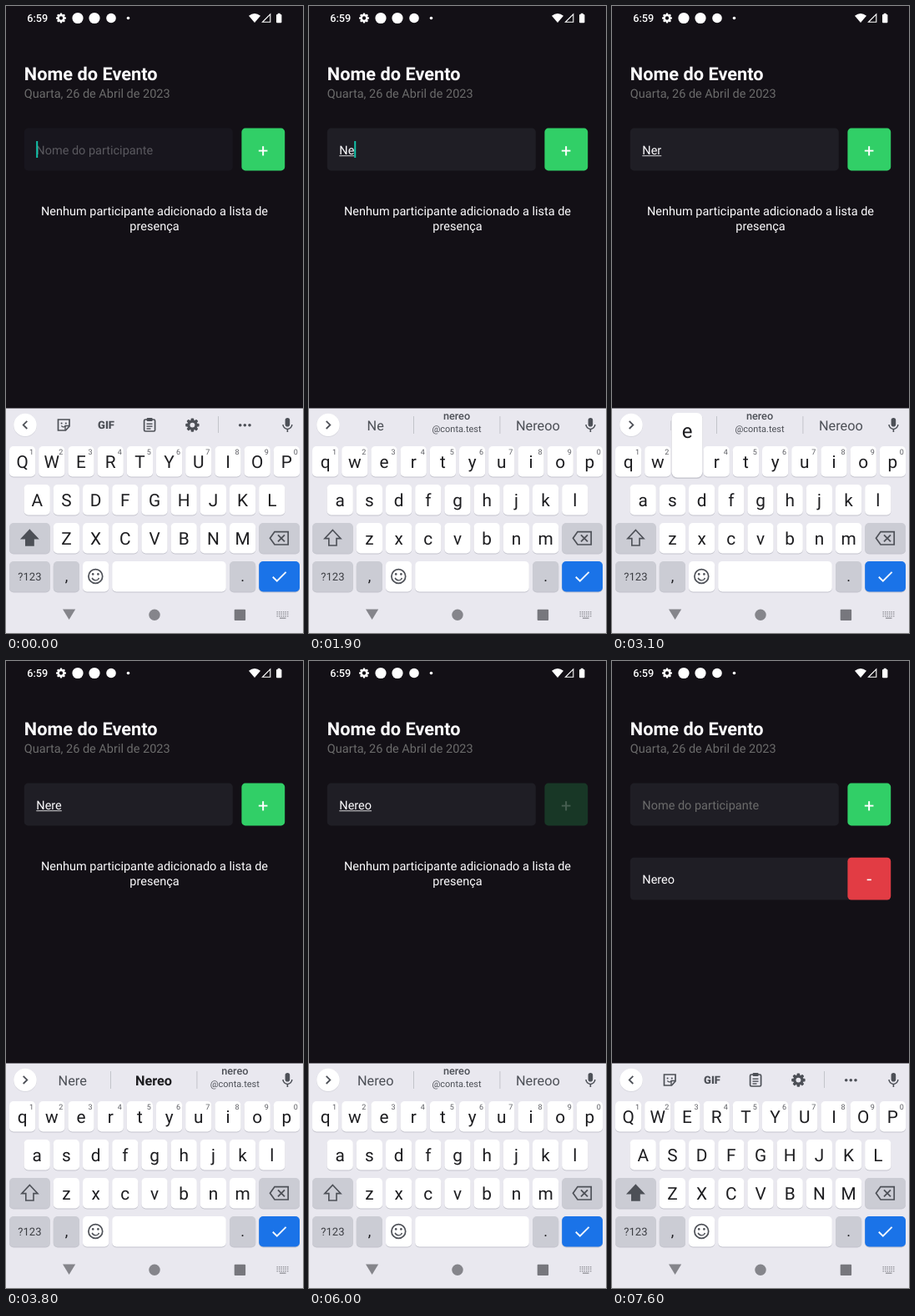
Write an HTML page with a canvas that moves like this. It is 356 by 752 pixels and loops after 8 s.

```html
<!DOCTYPE html>
<html lang="pt-BR">
<head>
<meta charset="utf-8">
<title>Lista de presença</title>
<style>
html, body { margin: 0; width: 100%; height: 100%; overflow: hidden; background: #131016; }
canvas { display: block; width: 356px; height: 752px; }
</style>
</head>
<body>
<canvas id="stage"></canvas>
<script>
const W = 356, H = 752, LOOP = 8000;
const canvas = document.getElementById('stage');
const dpr = window.devicePixelRatio || 1;
canvas.width = W * dpr;
canvas.height = H * dpr;
const c = canvas.getContext('2d');
c.scale(dpr, dpr);
// Fractional glyph advances, as on a phone screen
c.textRendering = 'geometricPrecision';

const BG = '#131016', FIELD = '#1f1e25', GREEN = '#31cf67', RED = '#e23c44';
const PANEL = '#e9e8ef', FN_KEY = '#cbccd4', INK = '#1d1d20', ICON = '#4d5057';
const NAME = 'Nereo';
const MAIL = '@conta.test';

// [time, letters typed]
const TYPED = [[0, 0], [1000, 1], [1500, 2], [2400, 3], [3200, 4], [4400, 5], [6100, 0]];
// [time, suggestions]; null shows the toolbar
const HINTS = [
  [0, null],
  [1000, ['N', 'No', 'Na']],
  [1600, ['Ne', MAIL, 'Nereoo']],
  [3300, ['Nere', '*' + NAME, MAIL]],
  [4500, [NAME, MAIL, 'Nereoo']],
  [6200, null]
];
// The caret starts visible and flips at these times
const CARET = [500, 1000, 2000, 2400, 3000, 3200, 3800, 4400, 5000, 5500, 6000, 6100, 6600, 7100, 7600];
// [start, end, key]
const PRESSES = [[900, 1000, 'n'], [2300, 2400, 'r'], [3100, 3200, 'e'], [4300, 4400, 'o']];

const ROWS = [['qwertyuiop', 4, 528], ['asdfghjkl', 21.6, 574], ['zxcvbnm', 56.8, 620]];
const PITCH = 35.2, KEY_W = 31.2, KEY_H = 36.5;

const at = (track, t) => track.filter(e => e[0] <= t).pop()[1];

function text(s, x, y, size, color, align = 'left', weight = 400) {
  c.font = `${weight} ${size}px Roboto, sans-serif`;
  c.textAlign = align;
  c.fillStyle = color;
  c.fillText(s, x, y);
}

function box(x, y, w, h, r, color) {
  c.fillStyle = color;
  c.beginPath();
  c.roundRect(x, y, w, h, r);
  c.fill();
}

function disc(x, y, r, color) {
  c.fillStyle = color;
  c.beginPath();
  c.arc(x, y, r, 0, Math.PI * 2);
  c.fill();
}

function path(points, close) {
  c.beginPath();
  points.forEach(p => c.lineTo(p[0], p[1]));
  if (close) c.closePath();
}

function poly(points, color) {
  path(points, true);
  c.fillStyle = color;
  c.fill();
}

function line(points, color, width, close) {
  path(points, close);
  c.strokeStyle = color;
  c.lineWidth = width;
  c.stroke();
}

function ring(x, y, r, color, width, from = 0, to = Math.PI * 2) {
  c.strokeStyle = color;
  c.lineWidth = width;
  c.beginPath();
  c.arc(x, y, r, from, to);
  c.stroke();
}

function gear(x, y, r, color, hole) {
  for (let i = 0; i < 4; i++) {
    c.save();
    c.translate(x, y);
    c.rotate(i * Math.PI / 4);
    box(-r * 0.22, -r, r * 0.44, r * 2, 1, color);
    c.restore();
  }
  disc(x, y, r * 0.76, color);
  disc(x, y, r * 0.36, hole);
}

function statusBar() {
  const w = '#fff';
  text('6:59', 25.3, 19, 12.7, w, 'left', 500);
  gear(66, 14.5, 6, w, BG);
  disc(86, 14.5, 6.6, w);
  disc(106, 14.5, 6.6, w);
  disc(126, 14.5, 5.8, w);
  disc(146.5, 14.5, 1.8, w);
  c.fillStyle = w;
  c.beginPath();
  c.moveTo(298, 20);
  c.lineTo(291, 11.8);
  c.quadraticCurveTo(298, 6.2, 305, 11.8);
  c.fill();
  line([[316.8, 9.8], [316.8, 19.3], [307.4, 19.3]], w, 1.1, true);
  box(324, 10, 6.4, 10.2, 1, w);
  box(325.7, 8.8, 3, 2, 0, w);
}

function mix(a, b, k) {
  return 'rgb(' + a.map((v, i) => Math.round(v + (b[i] - v) * k)).join(',') + ')';
}

function field(t) {
  const k = Math.min(1, t / 900);
  box(21.8, 146.6, 250, 50.8, 4.5, mix([24, 22, 30], [31, 30, 37], k));
  const typed = NAME.slice(0, at(TYPED, t));
  let w = 0;
  if (typed) {
    text(typed, 36.3, 178, 14.5, '#fdfcfe');
    w = c.measureText(typed).width;
    box(36.3, 179.2, w, 1, 0, '#d8d7da');
  } else {
    text('Nome do participante', 36.3, 178, 14.5, mix([90, 89, 95], [107, 107, 107], k));
  }
  if (CARET.filter(f => f <= t).length % 2 === 0) box(36.2 + w, 162, 2, 20, 0, '#12c2a9');
}

function addButton(t) {
  let alpha = 1;
  if (t >= 6000) {
    const k = Math.min(1, Math.max(0, (t - 6100) / 250));
    const ease = k < 0.5 ? 2 * k * k : 1 - 2 * (1 - k) * (1 - k);
    alpha = 0.2 + 0.8 * ease;
  }
  c.globalAlpha = alpha;
  box(282.4, 146.6, 51.8, 50.8, 4.5, GREEN);
  text('+', 308.3, 181, 21.8, '#fff', 'center');
  c.globalAlpha = 1;
}

function list(t) {
  if (t < 6100) {
    text('Nenhum participante adicionado a lista de', 178, 251, 14.5, '#fdfcfe', 'center');
    text('presença', 178, 268.5, 14.5, '#fdfcfe', 'center');
    return;
  }
  box(21.8, 235.7, 312.4, 50.8, 4.5, FIELD);
  text(NAME, 36.3, 267, 14.5, '#fdfcfe');
  box(282.4, 235.7, 51.8, 50.8, 4.5, RED);
  text('-', 308.3, 269, 21.8, '#fff', 'center');
}

function mic() {
  box(334.6, 494, 5.6, 10.5, 2.8, ICON);
  ring(337.4, 502, 5.4, ICON, 1.5, 0, Math.PI);
  line([[337.4, 507], [337.4, 511]], ICON, 1.6);
}

function toolbar() {
  // sticker
  line([[62.5, 496], [76, 496], [76, 504], [71.5, 509], [62.5, 509]], ICON, 1.7, true);
  line([[76, 503.5], [71, 503.5], [71, 509]], ICON, 1.4);
  disc(66.6, 500.4, 1, ICON);
  disc(71.8, 500.4, 1, ICON);
  ring(69, 501.8, 3, ICON, 1.2, 0.5, 2.6);
  text('GIF', 120, 507, 13, ICON, 'center', 900);
  // clipboard
  c.strokeStyle = ICON;
  c.lineWidth = 1.7;
  c.beginPath();
  c.roundRect(165.6, 496, 13, 14, 1.5);
  c.stroke();
  box(168.6, 494, 7, 4, 1, ICON);
  [500.5, 503.4, 506.3].forEach((y, i) => box(168.5, y, i < 2 ? 7 : 5, 1.4, 0, ICON));
  gear(223.4, 502.6, 8.2, ICON, PANEL);
  box(254, 492, 1, 20, 0, '#c3c4ca');
  [280.7, 286.3, 292].forEach(x => disc(x, 502.7, 1.8, ICON));
}

function hints(words) {
  [125, 228.4].forEach(x => box(x, 492, 1, 21, 0, '#c3c4ca'));
  words.forEach((word, i) => {
    const x = 79.7 + i * 97.3;
    if (word === MAIL) {
      text(NAME.toLowerCase(), x, 496, 12.7, ICON, 'center', 500);
      text(MAIL, x, 511, 11, ICON, 'center');
    } else if (word[0] === '*') {
      text(word.slice(1), x, 509, 16.3, INK, 'center', 700);
    } else {
      text(word, x, 509, 16.3, ICON, 'center');
    }
  });
}

function key(x, y, w, color) {
  box(x, y + 1, w, KEY_H, 5, '#c4c4cd');
  box(x, y, w, KEY_H, 5, color);
}

function letters(upper) {
  ROWS.forEach(([row, left, y], r) => [...row].forEach((ch, i) => {
    const x = left + i * PITCH, mid = x + KEY_W / 2;
    key(x, y, KEY_W, '#fff');
    text(upper ? ch.toUpperCase() : ch, mid, y + 26.3, 20.8, INK, 'center');
    if (r === 0) text(String((i + 1) % 10), mid + 11, y + 10, 9, '#5c5d63', 'center');
  }));
}

function functionKeys(upper) {
  key(4, 620, 48.8, FN_KEY);
  const arrow = [[28.4, 628.5], [38, 638.6], [33, 638.6], [33, 647], [23.8, 647], [23.8, 638.6], [18.8, 638.6]];
  if (upper) poly(arrow, ICON);
  line(arrow, ICON, 1.6, true);

  key(303.2, 620, 48.8, FN_KEY);
  line([[316.5, 638.3], [322, 630.6], [338.2, 630.6], [338.2, 646], [322, 646]], ICON, 1.7, true);
  line([[326, 634.3], [334, 642.3]], ICON, 1.7);
  line([[334, 634.3], [326, 642.3]], ICON, 1.7);

  key(4, 666, 48.8, FN_KEY);
  text('?123', 28.4, 689, 13, '#3b3d42', 'center');
  key(56.8, 666, KEY_W, FN_KEY);
  text(',', 72.4, 690, 18, INK, 'center');
  key(92, 666, KEY_W, '#fff');
  ring(107.3, 684, 8.4, ICON, 1.7);
  disc(104.2, 681.4, 1.3, ICON);
  disc(110.4, 681.4, 1.3, ICON);
  ring(107.3, 684.4, 4.4, ICON, 1.5, 0.35, 2.8);
  key(127.2, 666, 136.6, '#fff');
  key(268, 666, KEY_W, FN_KEY);
  text('.', 283.6, 690, 18, INK, 'center');
  key(303.2, 666, 48.8, '#1a73e8');
  line([[319.8, 684.8], [324.8, 689.6], [335.6, 678.8]], '#fff', 1.9);
}

function navBar() {
  const g = '#77777d';
  poly([[68, 723.5], [83.2, 723.5], [75.6, 736]], '#85858b');
  disc(178, 730.3, 6.7, '#85858b');
  box(273.7, 723.7, 13.4, 13.4, 1, g);
  for (let r = 0; r < 3; r++)
    for (let i = 0; i < 6; i++) box(324.5 + i * 2.5, 726 + r * 2.5, 1.4, 1.4, 0, '#97979e');
  box(328, 733.5, 7.5, 1.4, 0, '#97979e');
}

function preview(t, upper) {
  const press = PRESSES.find(p => t >= p[0] && t < p[1]);
  if (!press) return;
  const [row, left, y] = ROWS.find(r => r[0].includes(press[2]));
  const mid = left + row.indexOf(press[2]) * PITCH + KEY_W / 2;
  box(mid - 19, y - 39, 38, 78, 7, '#c9c9d1');
  box(mid - 18.5, y - 40, 37, 77.5, 7, '#fff');
  text(upper ? press[2].toUpperCase() : press[2], mid, y - 10, 24, INK, 'center');
}

function keyboard(t) {
  const words = at(HINTS, t), upper = !words;
  box(0, 482.5, W, H - 482.5, 0, PANEL);
  disc(23, 503, 14, '#d9d9e0');
  disc(23, 502.4, 13.7, '#fff');
  const d = upper ? 2.3 : -2.3;
  line([[23 + d, 497.8], [23 - d, 502.4], [23 + d, 507]], ICON, 1.8);
  if (words) hints(words); else toolbar();
  mic();
  letters(upper);
  functionKeys(upper);
  navBar();
  preview(t, upper);
}

function draw(now) {
  const t = Math.floor(now % LOOP / 100) * 100;
  box(0, 0, W, H, 0, BG);
  statusBar();
  text('Nome do Evento', 21.8, 89, 21.76, '#fdfcfe', 'left', 700);
  text('Quarta, 26 de Abril de 2023', 21.8, 110, 14.5, '#6b6b6b');
  field(t);
  addButton(t);
  list(t);
  keyboard(t);
}

const start = performance.now();
function tick() {
  draw(performance.now() - start);
  requestAnimationFrame(tick);
}
tick();
</script>
</body>
</html>
```
